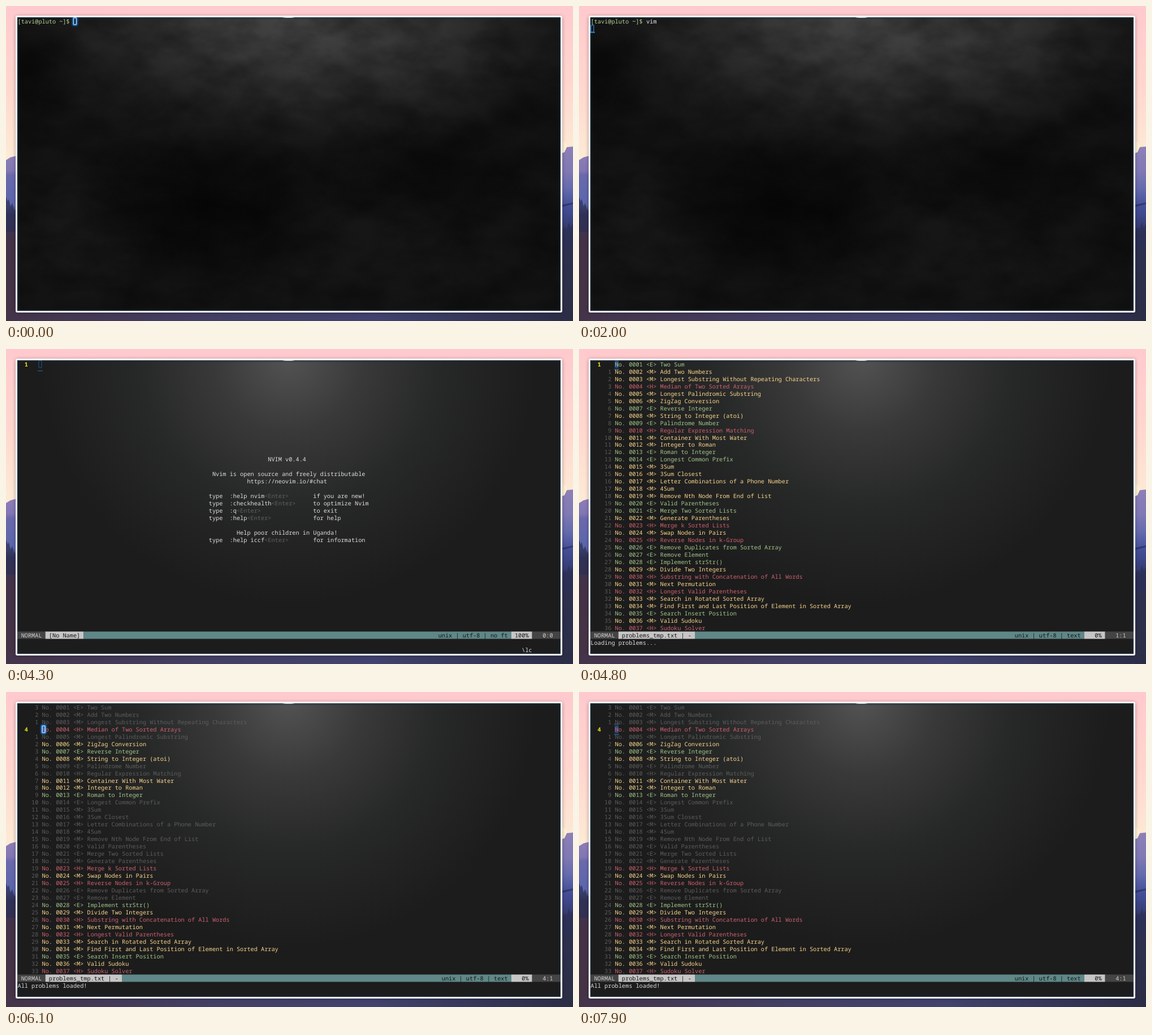
An HTML page that plays this animation: 1003x558 px, repeating every 8 s.

```html
<!DOCTYPE html>
<html lang="en">
<head>
<meta charset="utf-8">
<title>Problem list in a terminal editor</title>
<style>
html, body { margin: 0; width: 100%; height: 100%; overflow: hidden; background: #3f3a58; }
svg { display: block; width: 1003px; height: 558px; }
text {
  font: 500 10.25px "Noto Sans Mono", "DejaVu Sans Mono", monospace;
  white-space: pre;
  text-rendering: geometricPrecision;
  font-variant-ligatures: none;
}
</style>
</head>
<body>
<svg viewBox="0 0 1003 558" xmlns="http://www.w3.org/2000/svg">
  <defs>
    <linearGradient id="sky" x2="0" y2="1">
      <stop offset="0" stop-color="#ffc9cd"/>
      <stop offset=".55" stop-color="#ffd8cf"/>
      <stop offset="1" stop-color="#fdecd6"/>
    </linearGradient>
    <linearGradient id="leftLand" x2="0" y2="1">
      <stop offset="0" stop-color="#8c7eb7"/>
      <stop offset=".09" stop-color="#8277b4"/>
      <stop offset=".12" stop-color="#6a69ac"/>
      <stop offset=".3" stop-color="#5a66ab"/>
      <stop offset=".36" stop-color="#35365f"/>
      <stop offset=".5" stop-color="#433247"/>
      <stop offset="1" stop-color="#453345"/>
    </linearGradient>
    <linearGradient id="rightLand" x2="0" y2="1">
      <stop offset="0" stop-color="#8d80b7"/>
      <stop offset=".14" stop-color="#8079b4"/>
      <stop offset=".24" stop-color="#656bad"/>
      <stop offset=".35" stop-color="#434e98"/>
      <stop offset=".44" stop-color="#384079"/>
      <stop offset=".52" stop-color="#2d3150"/>
      <stop offset="1" stop-color="#2c2e45"/>
    </linearGradient>
    <linearGradient id="ground">
      <stop offset="0" stop-color="#44344a"/>
      <stop offset=".35" stop-color="#433f64"/>
      <stop offset=".65" stop-color="#41426e"/>
      <stop offset="1" stop-color="#2b2d46"/>
    </linearGradient>
    <radialGradient id="lamp" gradientUnits="userSpaceOnUse" cx="500" cy="14" r="440">
      <stop offset="0" stop-color="#535353"/>
      <stop offset=".3" stop-color="#393939"/>
      <stop offset=".6" stop-color="#272828"/>
      <stop offset="1" stop-color="#1c1c1c"/>
    </radialGradient>
    <radialGradient id="haze">
      <stop offset="0" stop-color="#464646"/>
      <stop offset=".35" stop-color="#353535"/>
      <stop offset=".65" stop-color="#232323" stop-opacity=".9"/>
      <stop offset="1" stop-color="#161616" stop-opacity="0"/>
    </radialGradient>
    <radialGradient id="dark">
      <stop offset="0" stop-color="#030303" stop-opacity=".75"/>
      <stop offset="1" stop-color="#030303" stop-opacity="0"/>
    </radialGradient>
    <radialGradient id="pale">
      <stop offset="0" stop-color="#fff" stop-opacity=".03"/>
      <stop offset="1" stop-color="#fff" stop-opacity="0"/>
    </radialGradient>
    <filter id="clouds" x="0" y="0" width="1" height="1" color-interpolation-filters="sRGB">
      <feTurbulence type="fractalNoise" baseFrequency=".012 .02" numOctaves="5" seed="7"/>
      <feColorMatrix values="0 0 0 0 0  0 0 0 0 0  0 0 0 0 0  1.6 0 0 0 -.5"/>
    </filter>
    <filter id="soft" x="-20%" y="-20%" width="140%" height="140%"><feGaussianBlur stdDeviation="3"/></filter>
    <filter id="glow" x="-150%" y="-100%" width="400%" height="300%"><feGaussianBlur stdDeviation="1.3"/></filter>
    <clipPath id="pane"><rect x="20" y="20" width="961" height="520"/></clipPath>
  </defs>

  <g id="wallpaper">
    <rect width="1003" height="275" fill="url(#sky)"/>
    <circle cx="980" cy="250" r="12" fill="#fff3d2"/>
    <path d="M0 273L8 268L20 265V558H0Z" fill="url(#leftLand)"/>
    <path d="M980 262L988 259L992 250L1003 249V558H980Z" fill="url(#rightLand)"/>
    <path d="M0 338l3 8 2-4 3 13 3-6 3 11 4 3v37H0Z" fill="#2d3053" opacity=".7"/>
    <path d="M984 352l19-4v3l-19 5ZM984 398l4-6 4 3 4-12 3 10 4-8v45h-19Z" fill="#2b3058" opacity=".7"/>
    <rect y="540" width="1003" height="18" fill="url(#ground)"/>
  </g>

  <rect x="17" y="18" width="967" height="526" rx="4" fill="#201828" opacity=".35" filter="url(#soft)"/>
  <rect x="17" y="17" width="967" height="526" rx="3" fill="#f6f7fb"/>

  <g clip-path="url(#pane)">
    <g id="shellBg">
      <rect x="20" y="20" width="961" height="521" fill="#131313"/>
      <ellipse cx="530" cy="20" rx="600" ry="265" fill="url(#haze)"/>
      <ellipse cx="350" cy="360" rx="270" ry="150" fill="url(#dark)"/>
      <ellipse cx="760" cy="300" rx="230" ry="110" fill="url(#dark)" opacity=".6"/>
      <ellipse cx="50" cy="110" rx="100" ry="100" fill="url(#dark)" opacity=".7"/>
      <ellipse cx="930" cy="180" rx="90" ry="50" fill="url(#dark)" opacity=".5"/>
      <ellipse cx="120" cy="400" rx="150" ry="130" fill="url(#pale)"/>
      <ellipse cx="640" cy="430" rx="240" ry="110" fill="url(#pale)" opacity=".7"/>
      <rect x="20" y="20" width="961" height="521" filter="url(#clouds)" opacity=".4"/>
    </g>
    <rect id="editorBg" x="20" y="20" width="961" height="521" fill="url(#lamp)"/>
    <rect x="20" y="20" width="961" height="520" fill="none" stroke="#1d3040" stroke-width="5" opacity=".5" filter="url(#glow)"/>
    <g id="under"></g>
    <g id="screen"></g>
    <g id="over"></g>
  </g>
  <ellipse cx="500" cy="19.7" rx="11" ry="1" fill="#fff"/>
</svg>

<script>
const LOOP = 8000, CW = 6.15, RH = 12.97, LEFT = 20.5, TOP = 20.6;
const $ = id => document.getElementById(id);
const colX = c => LEFT + c * CW;
const rowY = r => TOP + r * RH;

const LEVEL = { E: '#a3c78b', M: '#f9d68c', H: '#cd6170' };
const GREY = '#5d5d5d', WHITE = '#dedede', YELLOW = '#f0e413', INK = '#151515';

const problems = `E Two Sum
M Add Two Numbers
M Longest Substring Without Repeating Characters
H Median of Two Sorted Arrays
M Longest Palindromic Substring
M ZigZag Conversion
E Reverse Integer
M String to Integer (atoi)
E Palindrome Number
H Regular Expression Matching
M Container With Most Water
M Integer to Roman
E Roman to Integer
E Longest Common Prefix
M 3Sum
M 3Sum Closest
M Letter Combinations of a Phone Number
M 4Sum
M Remove Nth Node From End of List
E Valid Parentheses
E Merge Two Sorted Lists
M Generate Parentheses
H Merge k Sorted Lists
M Swap Nodes in Pairs
H Reverse Nodes in k-Group
E Remove Duplicates from Sorted Array
E Remove Element
E Implement strStr()
M Divide Two Integers
H Substring with Concatenation of All Words
M Next Permutation
H Longest Valid Parentheses
M Search in Rotated Sorted Array
M Find First and Last Position of Element in Sorted Array
E Search Insert Position
M Valid Sudoku
H Sudoku Solver`.split('\n').map(s => ({ level: s[0], title: s.slice(2) }));

const solved = new Set([1, 2, 3, 5, 9, 10, 14, 15, 16, 17, 18, 19, 20, 21, 22, 26, 27]);

// Each entry: row, command word, text of the right column
const intro = [
  [18, 'help nvim', 'if you are new!'], [19, 'checkhealth', 'to optimize Nvim'],
  [20, 'q', 'to exit'], [21, 'help', 'for help'], [24, 'help iccf', 'for information']
];

// Cursor: start time, row, column, look
const cursorKeys = [
  [0, 0, 16, 'rest'], [100, 0, 16, 'dim'], [200, 0, 16, 'off'], [400, 0, 16, 'dim'], [500, 0, 16, 'rest'],
  [1100, 0, 17, 'mark'], [1200, 0, 17, 'block'], [1300, 0, 18, 'mark'], [1400, 0, 18, 'block'],
  [1500, 0, 19, 'mark'], [1600, 0, 19, 'block'], [1700, 0, 19, 'hot'], [1800, 0, 19, 'rest'],
  [2000, 1, 0, 'spark'], [2100, 0, 0, 'block'], [2200, 0, 6, 'block'], [2300, 0, 6, 'hot'], [2400, 0, 6, 'rest'],
  [4300, 0, 6, 'ghost'], [4400, 0, 6, 'rest'],
  [4800, 0, 7, 'mark'], [4900, 0, 7, 'dim'], [5000, 0, 7, 'block'], [5100, 0, 7, 'hot'], [5200, 0, 7, 'rest'],
  [5700, 1, 7, 'mark'], [5800, 2, 7, 'mark'], [5900, 3, 7, 'mark'], [6000, 3, 7, 'block'], [6100, 3, 7, 'hot'],
  [6200, 4, 7, 'mark'], [6300, 4, 7, 'rest'],
  ...[5, 6, 7, 8, 9, 8, 7, 6].map((row, i) => [6600 + i * 100, row, 7, 'mark']),
  [7400, 6, 7, 'block'], [7500, 5, 7, 'mark'], [7700, 4, 7, 'mark'], [7900, 3, 7, 'mark']
];

const looks = {
  off: {},
  dim: { line: '#2c69a3' },
  ghost: { line: '#1f4468', bars: [18], bar: '#24527d' },
  spark: { line: '#2a75b4', bars: [13.2], bar: '#2d9be4' },
  mark: { fill: '#2a4878', bars: [-2.3, 15.5], bar: '#285580' },
  block: { fill: '#3b80c6' },
  hot: { fill: '#2c68aa', glow: 1, line: '#a5d8ff' },
  rest: { glow: .75, line: '#9dd3ff' }
};

const esc = s => s.replace(/&/g, '&amp;').replace(/</g, '&lt;');
const put = (row, col, s, fill = WHITE, bold) =>
  `<text x="${colX(col)}" y="${rowY(row) + 10.2}" fill="${fill}"${bold ? ' style="font-weight:700"' : ''}>${esc(s)}</text>`;
const band = (from, to, fill) =>
  `<rect x="${colX(from)}" y="${rowY(37)}" width="${(to - from) * CW}" height="${RH}" fill="${fill}"/>`;

function statusBar(name, type, percent, place) {
  const nameEnd = 10 + name.length, info = `unix | utf-8 | ${type}`;
  return band(-.1, 8, '#444') + band(8, nameEnd, '#c6c6c6') + band(nameEnd, 142, '#5f8787') +
    band(142, 148, '#c6c6c6') + band(148, 157, '#444') +
    put(37, 1, 'NORMAL', '#d0d0d0') + put(37, 9, name, INK) +
    put(37, 141 - info.length, info, INK) +
    put(37, 147 - percent.length, percent, INK) +
    put(37, 154 - place.length, place, '#d0d0d0');
}

function shell(t) {
  if (t >= 2100) return '';
  const typed = t < 1100 ? 0 : t < 1300 ? 1 : t < 1500 ? 2 : 3;
  const green = '#b3d195';
  return put(0, 0, '[tavi@pluto', green) + put(0, 12, '~') + put(0, 13, ']$', green) +
    put(0, 16, 'vim'.slice(0, typed), '#ececec');
}

function welcome(t) {
  let out = put(0, 2, '1', YELLOW, true) +
    put(13, 72, 'NVIM v0.4.4') +
    put(15, 56, 'Nvim is open source and freely distributable') +
    put(16, 66, 'https://neovim.io/#chat') +
    put(23, 63, 'Help poor children in Uganda!');
  for (const [row, cmd, note] of intro)
    out += put(row, 55, 'type  :' + cmd) + put(row, 62 + cmd.length, '<Enter>', '#606060') + put(row, 85, note);
  if (t >= 4300 && t < 4400) out += put(39, 145, '\\lc');
  if (t >= 4400) out += put(38, 0, 'Loading problems...');
  return out + statusBar('[No Name]', 'no ft', '100%', '0:0');
}

function list(t, current) {
  const loaded = t >= 5100;
  let out = '';
  problems.forEach(({ level, title }, i) => {
    const away = String(Math.abs(i - current));
    const fill = loaded && solved.has(i + 1) ? GREY : LEVEL[level];
    out += i === current ? put(i, 2, String(i + 1), YELLOW, true) : put(i, 6 - away.length, away, GREY);
    out += put(i, 7, `No. ${String(i + 1).padStart(4, '0')} <${level}> ${title}`, fill);
  });
  return out + statusBar('problems_tmp.txt | -', 'text', '0%', `${current + 1}:1`) +
    put(38, 0, loaded ? 'All problems loaded!' : 'Loading problems...');
}

function drawCursor(row, col, { fill, line, glow, bars = [], bar }) {
  const x = colX(col), y = rowY(row);
  const box = (grow, attrs) =>
    `<rect x="${x - grow}" y="${y - grow}" width="${CW + 2 * grow}" height="${RH + 2 * grow}" rx="1" ${attrs}/>`;
  let under = glow ? box(.2, `fill="none" stroke="#1672d8" stroke-width="3.6" opacity="${glow}" filter="url(#glow)"`) : '';
  if (fill) under += box(.3, `fill="${fill}"`);
  for (const dy of bars)
    under += `<rect x="${x - 1.5}" y="${y + dy - .8}" width="9" height="1.6" fill="${bar}"/>`;
  $('under').innerHTML = under;
  $('over').innerHTML = line ? box(-.5, `fill="none" stroke="${line}" stroke-width="1.5"`) : '';
}

let shown = -1;
function render(ms) {
  const t = Math.floor((ms % LOOP) / 100) * 100;
  if (t === shown) return;
  shown = t;
  const [, row, col, look] = cursorKeys.findLast(k => k[0] <= t);
  const inEditor = t >= 2200;
  $('shellBg').style.display = inEditor ? 'none' : '';
  $('editorBg').style.display = inEditor ? '' : 'none';
  $('screen').innerHTML = !inEditor ? shell(t) : t < 4800 ? welcome(t) : list(t, row);
  drawCursor(row, col, looks[look]);
}

const start = performance.now();
function tick() {
  render(performance.now() - start);
  requestAnimationFrame(tick);
}
tick();
</script>
</body>
</html>
```
